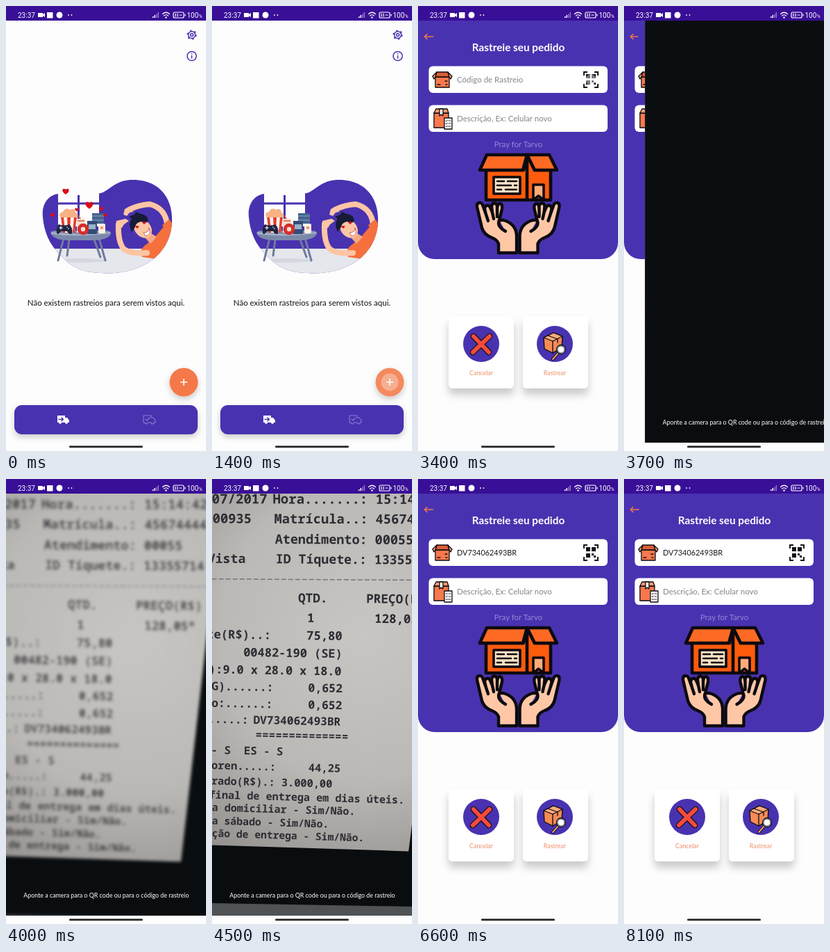
These frames come from a looping animation (288x640 px, 8200 ms). An HTML page:

```html
<!DOCTYPE html>
<html lang="pt">
<head>
<meta charset="utf-8">
<style>
html, body { margin: 0; width: 100%; height: 100%; overflow: hidden; background: #fdfdfd; }
svg { display: block; width: 100%; height: 100%; }
text { font-family: Lato, "Open Sans", sans-serif; font-size: 11.5px; white-space: pre; }
.mid { text-anchor: middle; }
.ink { stroke: #0c0a10; stroke-linejoin: round; stroke-linecap: round; }
.hint { fill: #85858a; }
.line { fill: none; stroke-linecap: round; stroke-linejoin: round; }
#receipt text { font-family: "Noto Sans Mono", "DejaVu Sans Mono", monospace; font-weight: 600; fill: #2d2c32; }
</style>
</head>
<body>
<svg viewBox="0 0 288 640">
<defs>
  <filter id="shade" x="-30%" y="-30%" width="160%" height="170%">
    <feDropShadow dx="0" dy="4" stdDeviation="4" flood-color="#000" flood-opacity=".2"/>
  </filter>
  <filter id="lift" x="-30%" y="-30%" width="160%" height="170%">
    <feDropShadow dx="0" dy="9" stdDeviation="6" flood-color="#000" flood-opacity=".2"/>
  </filter>
  <filter id="blur" x="0" y="0" width="288" height="640" filterUnits="userSpaceOnUse">
    <feGaussianBlur id="focus" stdDeviation="0"/>
  </filter>
  <radialGradient id="paper" gradientUnits="userSpaceOnUse" cx="230" cy="220" r="420">
    <stop offset="0" stop-color="#c8c6c3"/><stop offset=".5" stop-color="#bbb9b6"/><stop offset="1" stop-color="#888583"/>
  </radialGradient>
  <clipPath id="blobClip"><path id="blob" d="M53 304C51 286 60 271 77 270H132C148 269 154 250 183 250C218 250 238 273 239 304C240 331 228 352 211 365C190 381 160 386 136 384C102 383 88 369 77 357C62 342 55 325 53 304Z"/></clipPath>
  <clipPath id="lens"><rect y="21" width="288" height="607"/></clipPath>
  <path id="heart" d="M0 4C-8 -1 -4 -7 0 -3C4 -7 8 -1 0 4Z" fill="#d90d18"/>
  <g id="parcel" class="ink" stroke-width="1.3">
    <path d="M-10 -4H10V11H-10Z" fill="#f7794d"/>
    <path d="M-8 -11H8L10 -4H-10Z" fill="#d95e35"/>
    <path d="M-8 -11L-14 -5L-12 -1L-10 -4ZM8 -11L14 -5L12 -1L10 -4Z" fill="#ff9a6d"/>
    <path d="M-7 7H-3M4 2H7M5 7H7" fill="none"/>
  </g>
  <path id="hand" class="ink" stroke-width="4.4" fill="#ffc7a5" d="M116 355V342Q114 336 106 333Q95 329 92 319L85 289C84 282 91 281 93 286L98 300L96 292C96 286 102 285 104 290L107 297L106 288C107 282 113 282 114 288V294Q114 284 118 284Q122 285 121 292L117 308H123Q141 313 142 330V355ZM98 300L101 309M107 297L109 306M114 294V303M117 308Q113 317 126 324"/>
  <g id="truck"><path d="M0 0H11V3H14L17 7V10H15A2 2 0 0 1 11 10H6A2 2 0 0 1 2 10H0Z"/></g>
</defs>
<rect width="288" height="640" fill="#fdfdfd"/>

<g id="home">
  <rect y="21" width="288" height="619" fill="#fdfdfd"/>
  <g class="line" stroke="#4932b0" stroke-width="1.5">
    <circle cx="267.5" cy="41.5" r="5"/><circle cx="267.5" cy="41.5" r="2"/>
    <circle cx="267.5" cy="41.5" r="6.2" stroke-width="1.8" stroke-dasharray="2.4 4.09" stroke-linecap="butt"/>
    <circle cx="267.5" cy="72" r="6.6"/><path d="M267.5 71.5V75M267.5 68.8V69"/>
  </g>
  <use href="#blob" fill="#4932b0"/>
  <g clip-path="url(#blobClip)">
    <path d="M45 349H245V390H45Z" fill="#e5e7ec"/>
    <path d="M75 262H134V317H75Z" fill="#fdfdfd"/>
    <path d="M104.5 272V317M75 284H134" stroke="#4932b0" stroke-width="3"/>
    <ellipse cx="108" cy="366" rx="38" ry="3" fill="#d4d8e1"/>
  </g>
  <g class="line" stroke="#6f7b9d" stroke-width="3">
    <path d="M83 334L75 366M91 336L88 359M127 336L136 361M134 334L143 366"/>
  </g>
  <path d="M64 326Q65 323 72 323H146Q152 324 151 328Q147 336 128 337H88Q67 336 64 326Z" fill="#7b88aa"/>
  <path d="M66 325Q108 331 150 325V327Q108 333 65 328Z" fill="#a7b1ca"/>
  <path d="M79 303H102L99 326H82Z" fill="#fff2e8"/>
  <path d="M79 303H83L85 326H82ZM88 303H93L92 326H89ZM98 303H102L99 326H96Z" fill="#e33b31"/>
  <path d="M78 304Q75 297 82 296Q86 289 92 293Q99 290 100 297Q106 300 102 304Z" fill="#f8b284"/>
  <path d="M124 298H141V313H124Z" fill="#46638f"/>
  <path d="M124 302H141M124 308H141" stroke="#8da4c3"/>
  <path d="M102 306H114V326H102Z" fill="#f4ded2"/>
  <path d="M103 309H113M105 302L107 306" stroke="#ec7652" stroke-width="2"/>
  <path d="M117 309H131V328H117Z" fill="#354c78"/><path d="M119 314H129V321H119Z" fill="#9ab2cb"/>
  <rect x="133" y="313" width="10" height="14" rx="2" fill="#fff0e6"/><path d="M136 317H140V321H136Z" fill="#ee9b75"/>
  <circle cx="111" cy="321" r="5.7" fill="none" stroke="#d92c28" stroke-width="5"/>
  <circle cx="111" cy="321" r="3" fill="#fbe1d4"/>
  <path d="M76 314Q84 317 91 314Q97 320 95 327Q92 330 88 324H79Q74 331 73 326Q72 319 76 314Z" fill="#20243f"/>
  <path d="M77 319H81M79 317V321M88 318V318.5M90 320V320.5" class="line" stroke="#d7dcf1" stroke-width="1.4"/>
  <g clip-path="url(#blobClip)">
    <path d="M203 342L213 334L230 314L246 315V353L218 364L196 361Q190 351 203 342Z" fill="#f5703d"/>
    <g class="line" stroke="#fdc5a4" stroke-width="8">
      <path d="M232 315Q230 291 207 285Q191 286 177 293"/><path d="M203 355Q178 357 169 349Q161 338 162 314"/>
    </g>
    <path d="M230 311Q235 317 238 325" stroke="#f5703d" stroke-width="13" fill="none"/>
  </g>
  <path d="M180 288L171 292L169 300L174 302L178 297L183 296ZM158 317L159 309L172 306L177 309L170 314L167 319Z" fill="#fdc5a4"/>
  <path d="M203 323L217 332L208 342L200 333Z" fill="#f3a985"/>
  <ellipse cx="197" cy="320" rx="11.5" ry="15" transform="rotate(-38 197 320)" fill="#fdc5a4"/>
  <path d="M181 325Q175 313 181 306L177 303L185 300L187 296L194 299Q204 300 205 309Q200 315 195 310Q187 311 186 318Z" fill="#171b36"/>
  <use href="#heart" transform="translate(189 318) scale(.48)"/><use href="#heart" transform="translate(199 312) scale(.48)"/>
  <path d="M198 326Q206 326 206 319Q210 330 201 331Z" fill="#fff" stroke="#c74634" stroke-width=".8"/>
  <g id="hearts"></g>
  <text x="144" y="431" class="mid" fill="#111">Não existem rastreios para serem vistos aqui.</text>
  <g filter="url(#shade)"><circle id="fab" cx="256" cy="541" r="20.5" fill="#f57849"/></g>
  <circle id="ripple" cx="256" cy="541" r="0" fill="#fff"/>
  <path d="M251 541H261M256 536V546" stroke="#fff" stroke-width="1.6"/>
  <rect x="12" y="574" width="264" height="42" rx="11" fill="#4932b0" filter="url(#shade)"/>
  <use href="#truck" x="74" y="589" fill="#fff"/>
  <path d="M76 594.5H82M80 592L82.5 594.5L80 597" class="line" stroke="#4932b0" stroke-width="1.4"/>
  <g class="line" stroke="#8a7bd0" stroke-width="1.1"><use href="#truck" x="198" y="589"/><path d="M201 594L203 596L207 592"/></g>
</g>

<g id="form">
  <rect y="21" width="288" height="619" fill="#fdfdfd"/>
  <path d="M0 21H288V340A24 24 0 0 1 264 364H24A24 24 0 0 1 0 340Z" fill="#4932b0"/>
  <g class="line" stroke="#f57849" stroke-width="1.6"><path d="M13 40.5L9.5 44L13 47.5"/><path id="tail" d="M10 44H21.5"/></g>
  <text x="144.5" y="65" class="mid" fill="#fff" style="font-size:15.3px;font-weight:700">Rastreie seu pedido</text>
  <g fill="#fff"><rect x="15.5" y="86.5" width="257.500" height="38.5" rx="6"/><rect x="15.5" y="142.500" width="257.500" height="38.5" rx="6"/></g>
  <use href="#parcel" x="35" y="106"/>
  <g class="ink" stroke-width="1.3">
    <path d="M23 154H44V175H23Z" fill="#f7794d"/><path d="M23 154L26 148H42L44 154Z" fill="#ff9a6d"/>
    <path d="M31 148H36V158L33.5 156L31 158Z" fill="#fff"/><path d="M38 161H49V177H38Z" fill="#fff"/>
    <path d="M40 165L41 166L42.5 164M44 165H47M40 169L41 170L42.5 168M44 169H47M40 173H47" fill="none" stroke-width=".8"/>
  </g>
  <text id="code" x="56" y="109.5"></text>
  <text x="56" y="165.5" class="hint">Descrição, Ex: Celular novo</text>
  <path d="M239 100V95H244M254 95H259V100M259 112V117H254M244 117H239V112" fill="none" stroke="#111" stroke-width="1.9"/>
  <path d="M242 98H248V104H242ZM250 98H256V104H250ZM242 107H248V113H242ZM250 107H253V110H250ZM253 110H256V113H253Z" fill="#111"/>
  <circle id="touch" cx="249" cy="106" r="0" fill="#fff"/>
  <text x="144.5" y="203" class="mid" fill="#9485d6">Pray for Tarvo</text>
  <g class="ink" stroke-width="4.6">
    <path d="M98 236H152L157 214L168 236H191V279H98Z" fill="#fe5b0c"/>
    <path d="M99 214H157L151 236H89ZM157 214H189L200 236H168Z" fill="#fe6a24"/>
    <path d="M157 214V279" fill="none"/>
    <path d="M109 246H147V270H109Z" fill="#ffe2c5" stroke-width="3.6"/>
    <path d="M114 252H124M129 252H142M114 258H134M139 258H142M114 264H120M126 264H142" fill="none" stroke-width="2.6"/>
    <path d="M166 279V257H181V279L173.5 273Z" fill="#ffad78" stroke-width="3.6"/>
  </g>
  <use href="#hand"/><use href="#hand" transform="translate(288.500) scale(-1 1)"/>
  <g fill="#fff" filter="url(#lift)"><rect x="44" y="446" width="94" height="104" rx="6"/><rect x="151" y="446" width="94" height="104" rx="6"/></g>
  <g fill="#4932b0"><circle cx="91" cy="486" r="26"/><circle cx="197" cy="486" r="26"/></g>
  <path d="M80 475L102 498M103 475L79 498" class="line" stroke="#111" stroke-width="8.5"/>
  <path d="M80 475L102 498M103 475L79 498" class="line" stroke="#f54b3c" stroke-width="6"/>
  <g class="ink" stroke-width="1.3">
    <path d="M181 477L195 470L208 475L207 491L194 499L182 493Z" fill="#f58b57"/>
    <path d="M181 477L194 482L208 475L195 470Z" fill="#ffac7b"/><path d="M194 482V499M187 474L201 479V484" fill="none"/>
    <path d="M202 499L194 508" stroke-width="4"/><path d="M202 499L194 508" style="stroke:#f5a173" stroke-width="2"/>
    <circle cx="206" cy="494" r="6.5" fill="#dce5ee"/><circle cx="206" cy="494" r="5" fill="#fff" stroke-width=".7"/>
  </g>
  <g class="mid" fill="#ef8d66"><text x="91" y="531" style="font-size:8.9px">Cancelar</text><text x="197" y="531" style="font-size:8.9px">Rastrear</text></g>
</g>

<rect id="blank" y="21" width="288" height="619" fill="#fdfdfd"/>
<g id="camera">
  <rect y="21" width="288" height="619" fill="#fdfdfd"/>
  <g clip-path="url(#lens)">
    <rect y="21" width="288" height="607" fill="#0a0d10"/>
    <g id="shot" filter="url(#blur)">
      <g id="receipt">
        <path d="M-60 604L400 612V660H-60Z" fill="#4f5355"/>
        <path d="M-60 -30H366L332 226L292 531L-60 520Z" fill="url(#paper)"/>
        <path d="M-10 141L345 143" stroke="#77757a" stroke-width="1.5" stroke-dasharray="7 3"/>
      </g>
    </g>
    <text x="144.5" y="601.5" class="mid" fill="#fff" style="font-size:8.85px">Aponte a camera para o QR code ou para o código de rastreio</text>
  </g>
</g>

<rect width="288" height="21" fill="#380f96"/>
<g fill="#fff">
  <text x="17" y="17" style="font:10px Roboto,sans-serif">23:37</text>
  <text x="260.5" y="17" style="font:10px Roboto,sans-serif">100<tspan font-size="7">%</tspan></text>
  <path d="M46 10H53V12L56 10V16L53 14V16H46Z"/>
  <rect x="59" y="9" width="8.5" height="8.5"/><circle cx="77" cy="13" r="4.5"/>
  <circle cx="90" cy="13" r=".9"/><circle cx="94.5" cy="13" r=".9"/>
  <path d="M211 15H212.5V17H211ZM213.5 13H215V17H213.5Z"/><path d="M216 11.5H217.5V17H216ZM218.5 9H220V17H218.5Z" opacity=".45"/>
  <circle cx="230.5" cy="16.5" r="1.2"/>
</g>
<g class="line" stroke="#fff" stroke-width="1.2">
  <path d="M225.5 11.5Q230.5 7 235.5 11.5M227.5 14Q230.5 11.5 233.5 14"/>
  <rect x="241" y="9" width="15" height="8" rx="2"/><path d="M258 12V14M244 11V15M247 11V15M250 13H253"/>
</g>
<rect x="91" y="632.5" width="106" height="2.8" rx="1.4" fill="#222"/>
</svg>

<script>
const LOOP = 8200;
const $ = id => document.getElementById(id);
const set = (id, attrs) => { for (const k in attrs) $(id).setAttribute(k, attrs[k]); };
const clamp = v => Math.max(0, Math.min(1, v));
const span = (t, from, length) => clamp((t - from) / length);
const out = p => 1 - (1 - p) ** 3;
const smooth = p => p * p * (3 - 2 * p);
const show = (id, on) => $(id).style.display = on ? '' : 'none';
const slide = (id, x) => set(id, { transform: `translate(${x} 0)` });

// x, y, size
const hearts = [[86, 267, 1], [120, 287, 1.2], [102, 293, .6], [67, 301, .7], [137, 292, .7], [143, 301, .6]];

// baseline, then pairs of x and text
const rows = [
  [33, -1, '/07/2017', 98, 'Hora.......: 15:14:42'],
  [61, 0, '200935', 100, 'Matrícula..: 45674444'],
  [90, 0, '5', 101, 'Atendimento: 00055'],
  [118, 4, 'Vista', 102, 'ID Tíquete.: 13355714'],
  [173, 134, 'QTD.', 232, 'PREÇO(R$)'],
  [201, 147, '1', 244, '128,05*'],
  [226, 2, 'te(R$)..:', 146, '75,80'],
  [251, 55, '00482-190 (SE)'],
  [276, -5, 'm):9.0 x 28.0 x 18.0'],
  [300, -1, 'KG)......:', 148, '0,652'],
  [324, -1, 'do:......:', 148, '0,652'],
  [347, 4, '.....:', 69, 'DV734062493BR'],
  [368, 72, '=============='],
  [391, 8, '- S  ES - S'],
  [413, -1, 'loren.....:', 148, '44,25'],
  [435, -1, 'arado(R$).: 3.000,00'],
  [455, 5, 'final de entrega em dias úteis.'],
  [473, 0, 'ga domiciliar - Sim/Não.'],
  [492, 0, 'ga sábado - Sim/Não.'],
  [510, 0, 'ição de entrega - Sim/Não.']
];

function svg(tag, attrs, parent) {
  const el = document.createElementNS('http://www.w3.org/2000/svg', tag);
  for (const k in attrs) el.setAttribute(k, attrs[k]);
  return $(parent).appendChild(el);
}

for (const [y, ...parts] of rows) {
  const size = (11.4 - (y - 33) * .0055) / .6;
  for (let i = 0; i < parts.length; i += 2) {
    const el = svg('text', { x: parts[i], y, transform: `rotate(${y / 290} 0 ${y})` }, 'receipt');
    el.style.fontSize = size + 'px';
    el.textContent = parts[i + 1];
  }
}
const heartEls = hearts.map(() => svg('use', { href: '#heart' }, 'hearts'));

function draw(t) {
  show('home', t < 2000);
  hearts.forEach(([x, y, size], i) => {
    const p = smooth(span(t, 400 + i * 70, 450));
    heartEls[i].setAttribute('transform', `translate(${x} ${y - 8 * p}) scale(${size * (1 - p)})`);
  });
  const press = span(t, 1290, 300);
  set('fab', { fill: press > 0 ? '#f38a5e' : '#f57849' });
  set('ripple', { r: 20.5 * Math.sqrt(press), opacity: press ? .4 * (1 - press * .6) : 0 });

  show('form', t >= 1500 && (t < 3950 || t >= 5250));
  slide('form', 288 * (1 - out(span(t, 1500, 400))));
  $('form').style.opacity = t < 5000 ? 1 : span(t, 5250, 150);
  const filled = t > 5000;
  $('code').textContent = filled ? 'DV734062493BR' : 'Código de Rastreio';
  $('code').style.fill = filled ? '#18181c' : '#85858a';
  $('code').style.fontSize = filled ? '10.9px' : '';
  set('tail', { d: `M10 44H${20.5 + Math.sin(t * Math.PI / 400)}` });
  const tap = t < 5000 ? span(t, 3280, 250) : 0;
  set('touch', { r: 16 * tap, opacity: tap ? .45 : 0 });

  show('blank', t >= 3950 && t < 5250);
  show('camera', t >= 3500 && t < 5308);
  const leave = Math.sin(span(t, 4900, 408) * Math.PI / 2);
  slide('camera', 288 * (1 - out(span(t, 3500, 380)) + leave));
  const off = 1 - smooth(span(t, 4050, 650));
  set('receipt', { transform: `matrix(1 0 ${.014 * off} ${1 + .02 * off} ${-47.5 * off} ${9 * off})` });
  set('focus', { stdDeviation: 2.1 * (1 - smooth(span(t, 4150, 400))) });
  $('shot').style.opacity = span(t, 3700, 200);
}

function tick(now) {
  draw(now % LOOP);
  requestAnimationFrame(tick);
}
draw(0);
requestAnimationFrame(tick);
</script>
</body>
</html>
```
